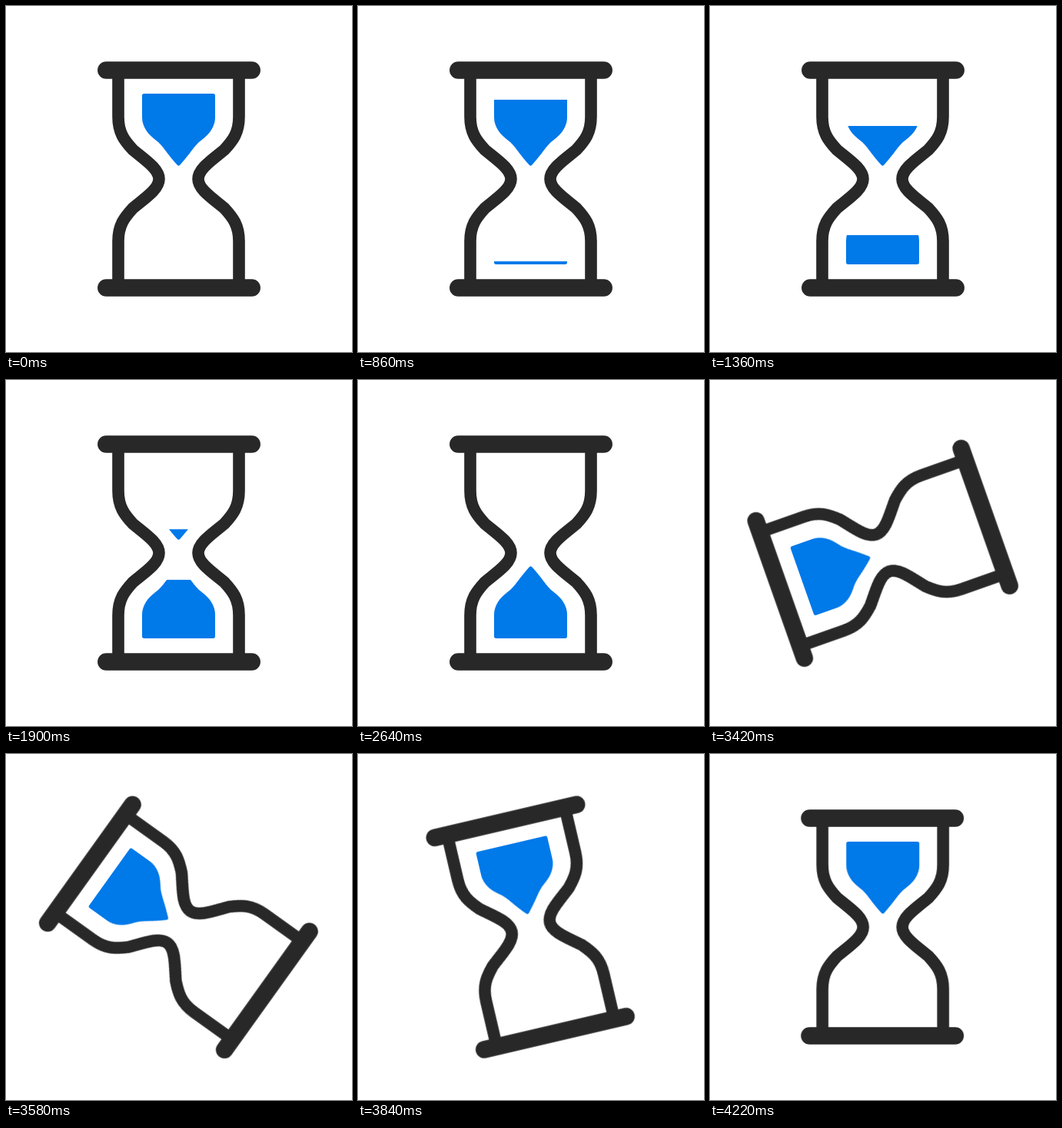
These frames come from a looping animation (450x450 px, 4.24 s). An HTML page:

```html
<!DOCTYPE html>
<html lang="en">
<head>
<meta charset="utf-8">
<title>Hourglass</title>
<style>
  html, body { margin: 0; width: 100%; height: 100%; overflow: hidden; background: #fff; }
  svg { display: block; width: 100%; height: 100%; }
  .frame { fill: none; stroke: #282828; }
  .bar { stroke-width: 22.5; stroke-linecap: round; }
  .wall { stroke-width: 15.6; }
  .sand { fill: #0079e9; }

  .turn { transform-origin: 224.6px 225px; animation: turn 4240ms infinite; }
  .level { animation: flow 4240ms infinite; }

  /* the glass flips once the sand has run through */
  @keyframes turn {
    0%, 68.396% { transform: rotate(0deg); animation-timing-function: cubic-bezier(.55, 0, .272, 1); }
    99.528%, 100% { transform: rotate(180deg); }
  }

  /* distance the sand level has moved in both bulbs */
  @keyframes flow {
    0%, 11.792% { transform: translateY(0); animation-timing-function: cubic-bezier(.333, 0, .667, .437); }
    24.528% { transform: translateY(16px); animation-timing-function: cubic-bezier(.333, .2, .667, .72); }
    37.264% { transform: translateY(61px); animation-timing-function: cubic-bezier(.333, .46, .667, .823); }
    50% { transform: translateY(88.4px); animation-timing-function: cubic-bezier(.333, .543, .667, 1); }
    63.679%, 100% { transform: translateY(98px); }
  }
</style>
</head>
<body>
<svg viewBox="0 0 450 450">
  <defs>
    <clipPath id="bulb">
      <path d="M179.5 114H269.5Q272 114 272 116.5V145C272 157 264 167 256 173
               C244 182 243 188 227 206Q224.5 209.5 222 206
               C206 188 205 182 193 173C185 167 177 157 177 145V116.5Q177 114 179.5 114Z"/>
    </clipPath>
    <path id="wall" d="M146 90V144C146 165 154 175 165 187C182 201 199 212 199 225
                       S182 249 165 263C154 275 146 285 146 306V360"/>
  </defs>
  <g class="turn">
    <g class="frame">
      <use class="wall" href="#wall"/>
      <use class="wall" href="#wall" transform="matrix(-1 0 0 1 449 0)"/>
      <path class="bar" d="M130.3 83.5H319.7M130.3 366.5H319.7"/>
    </g>
    <g class="sand">
      <g clip-path="url(#bulb)">
        <rect class="level" x="170" y="114" width="110" height="110"/>
      </g>
      <g transform="rotate(180 224.5 225)">
        <g clip-path="url(#bulb)">
          <rect class="level" x="170" y="0" width="110" height="110"/>
        </g>
      </g>
    </g>
  </g>
</svg>
</body>
</html>
```
